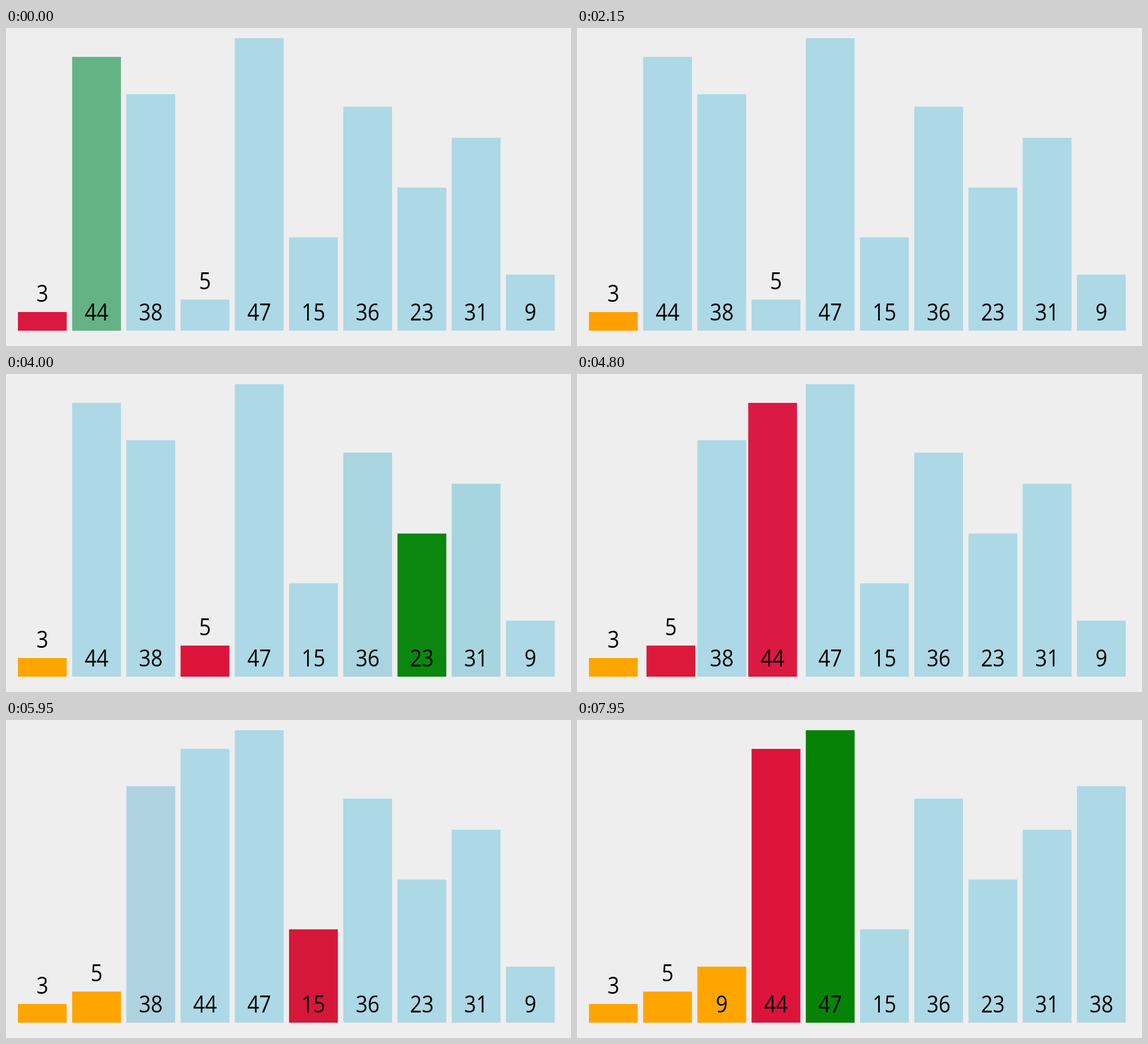
These frames come from a looping animation (998x561 px, 8 s). An HTML page:

```html
<!DOCTYPE html>
<html lang="en">
<head>
<meta charset="utf-8">
<title>Selection sort</title>
<style>
  html, body { margin: 0; width: 100%; height: 100%; overflow: hidden; background: #eee; }
  svg { display: block; width: 100%; height: 100%; }
  text { font: 19.2px "Open Sans", "Noto Sans", sans-serif; text-anchor: middle; }
</style>
</head>
<body>
<svg viewBox="0 0 521 255.5" preserveAspectRatio="none"></svg>
<script>
const VALUES = [3, 44, 38, 5, 47, 15, 36, 23, 31, 9];
const PLAIN = [173, 216, 230], COMPARED = [0, 128, 0], CHOSEN = [220, 20, 60], SORTED = [255, 165, 0];
const LEFT = 11, BASE = 243.2, PITCH = 50, WIDTH = 45, UNIT = 5;
const LOOP = 8000, TICK = 50, STEP = 200, FADE = 250;

// Each state lists, per bar, the pose to reach: [slot, r, g, b].
function sortStates() {
  const order = VALUES.map((_, i) => i);
  const colors = VALUES.map(() => PLAIN);
  const states = [];
  const paint = (slot, color) => { colors[order[slot]] = color; };
  const push = () => states.push(VALUES.map((_, id) => [order.indexOf(id), ...colors[id]]));

  for (let i = 0; i < order.length - 1; i++) {
    let min = i;
    paint(i, CHOSEN);
    push();
    for (let j = i + 1; j < order.length; j++) {
      paint(j, COMPARED);
      push();
      paint(j, PLAIN);
      if (VALUES[order[j]] < VALUES[order[min]]) {
        paint(min, PLAIN);
        paint(j, CHOSEN);
        min = j;
        push();
      }
    }
    paint(i, CHOSEN);
    push();
    if (min !== i) {
      [order[i], order[min]] = [order[min], order[i]];
      push();
      paint(min, PLAIN);
    }
    paint(i, SORTED);
    push();
  }
  return states;
}

const states = sortStates();
const startOf = n => n < 2 ? -318 + n * STEP : 150 + (n - 2) * STEP;
const ease = u => u < 0.5 ? 4 * u ** 3 : 1 - 4 * (1 - u) ** 3;

// A new state interrupts the running transition and continues from its pose.
function poseAt(time) {
  let pose = VALUES.map((_, i) => [i, ...PLAIN]);
  for (let n = 0; n < states.length && startOf(n) <= time; n++) {
    const elapsed = Math.min(time, startOf(n + 1)) - startOf(n);
    const p = ease(Math.min(1, elapsed / FADE));
    pose = pose.map((bar, id) => bar.map((v, k) => v + (states[n][id][k] - v) * p));
  }
  return pose;
}

const svg = document.querySelector('svg');
function add(parent, name, attrs) {
  const node = document.createElementNS(svg.namespaceURI, name);
  for (const key in attrs) node.setAttribute(key, attrs[key]);
  return parent.appendChild(node);
}

const bars = VALUES.map(value => {
  const group = add(svg, 'g', {});
  const height = value * UNIT;
  const rect = add(group, 'rect', { y: BASE - height, width: WIDTH, height });
  const labelBase = height < 30 ? BASE - height : BASE;
  add(group, 'text', { x: WIDTH / 2, y: labelBase - 8.2 }).textContent = value;
  return { group, rect };
});

function draw(time) {
  poseAt(time).forEach(([slot, ...rgb], id) => {
    bars[id].group.setAttribute('transform', `translate(${LEFT + slot * PITCH} 0)`);
    bars[id].rect.setAttribute('fill', `rgb(${rgb.map(Math.round)})`);
  });
}

let begin;
function tick(now) {
  begin ??= now;
  const time = (now - begin + 8) % LOOP;
  draw(Math.floor(time / TICK) * TICK);
  requestAnimationFrame(tick);
}
draw(0);
requestAnimationFrame(tick);
</script>
</body>
</html>
```
